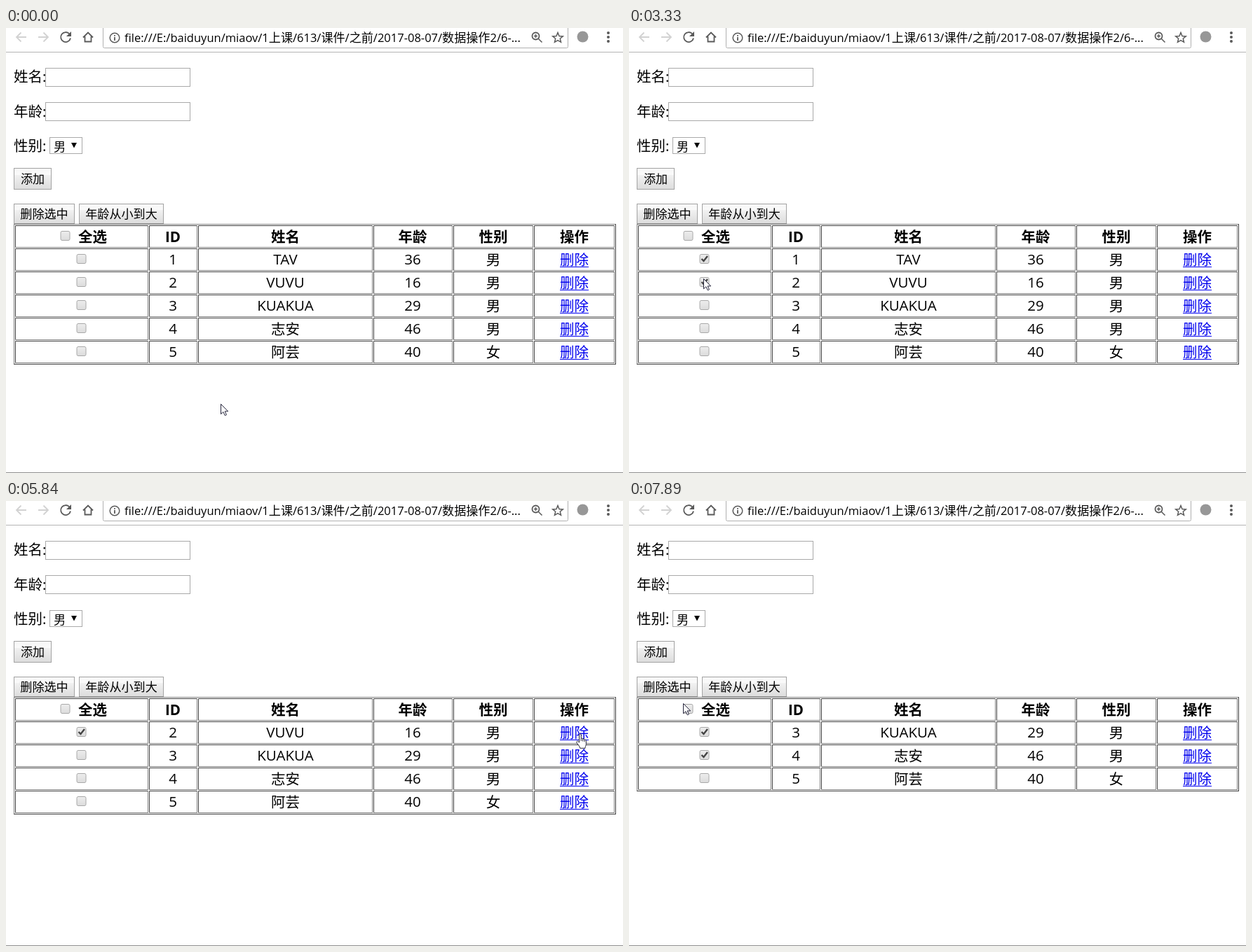
Recreate the animation shown at these times as an HTML page. Size 880 px wide and 636 px high, loop 8000 ms.

```html
<!DOCTYPE html>
<html lang="zh">
<head>
<meta charset="utf-8">
<title>数据操作</title>
<style>
html, body { margin: 0; width: 100%; height: 100%; overflow: hidden; background: #fff; }
svg { display: block; width: 880px; height: 636px; }
text { font: 20.5px "Open Sans", "Noto Sans CJK SC", sans-serif; white-space: pre; }
.mid { text-anchor: middle; }
.bold { font-weight: 700; }
.ui { font-size: 17.1px; }
.url { font-size: 16.5px; }
.url tspan { font-size: 17.1px; }
.dark { stroke: #404040; fill: none; }
.light { stroke: #808080; fill: none; }
.field { fill: #fff; stroke: #a9a9a9; }
.btn { fill: url(#btn); stroke: #a3a3a3; }
.box { fill: url(#box); stroke: #a8a8a8; }
.tick { fill: none; stroke: #444; stroke-width: 2.4; visibility: hidden; }
.icon { fill: none; stroke: #5a5a5a; stroke-width: 1.8; }
.off { stroke: #d2d2d2; }
.thin { stroke-width: 1.5; }
.link { fill: #00e; }

/* every change is a hard step; 1% = 80 ms */
.tick, .row, .shift, .side, #cursor, #arrow, #hand { animation: 8s step-end infinite; }
#row0 { animation-name: gone1; }
#row1 { animation-name: up1; }
#row1 > g { animation: gone2 8s step-end infinite; }
.shift { animation-name: up2; }
.side { animation-name: shrink; }
#row0 .tick { animation-name: tick0; }
#row1 .tick { animation-name: tick1; }
#row2 .tick { animation-name: tick2; }
#row3 .tick { animation-name: tick3; }
#cursor { animation-name: move; }
#arrow { animation-name: arrow; }
#hand { animation-name: hand; }
@keyframes gone1 { 0% { opacity: 1 } 67.625%, 100% { opacity: 0 } }
@keyframes gone2 { 0% { opacity: 1 } 76.375%, 100% { opacity: 0 } }
@keyframes up1 { 0% { transform: none } 67.625%, 100% { transform: translateY(-33px) } }
@keyframes up2 {
  0% { transform: none }
  67.625% { transform: translateY(-33px) }
  76.375%, 100% { transform: translateY(-66px) }
}
@keyframes shrink { 0% { height: 201px } 67.625% { height: 168px } 76.375%, 100% { height: 135px } }
@keyframes tick0 { 0% { visibility: hidden } 34.5%, 100% { visibility: visible } }
@keyframes tick1 { 0% { visibility: hidden } 41.625%, 100% { visibility: visible } }
@keyframes tick2 { 0% { visibility: hidden } 88.125%, 100% { visibility: visible } }
@keyframes tick3 { 0% { visibility: hidden } 91.75%, 100% { visibility: visible } }
@keyframes arrow { 0% { opacity: 1 } 60.625% { opacity: 0 } 77.875%, 100% { opacity: 1 } }
@keyframes hand { 0% { opacity: 0 } 60.625% { opacity: 1 } 77.875%, 100% { opacity: 0 } }
@keyframes move {
  0% { transform: translate(306px, 537px) }
  1.875% { transform: translate(336px, 518px) }
  3.625% { transform: translate(350px, 460px) }
  5.375% { transform: translate(290px, 385px) }
  7.125% { transform: translate(190px, 315px) }
  8.875% { transform: translate(112px, 280px) }
  10.625% { transform: translate(90px, 305px) }
  12.25% { transform: translate(98px, 323px) }
  14.125% { transform: translate(88px, 308px) }
  15.625% { transform: translate(80px, 292px) }
  17.5% { transform: translate(94px, 372px) }
  19.375% { transform: translate(100px, 450px) }
  24% { transform: translate(101px, 430px) }
  25.75% { transform: translate(100px, 375px) }
  27.5% { transform: translate(98px, 324px) }
  29.25% { transform: translate(78px, 292px) }
  31% { transform: translate(92px, 312px) }
  32.75% { transform: translate(104px, 327px) }
  34.5% { transform: translate(105px, 328px) }
  36.25% { transform: translate(106px, 349px) }
  38% { transform: translate(103px, 355px) }
  39.875% { transform: translate(107px, 357px) }
  41.625% { transform: translate(106px, 358px) }
  49.875% { transform: translate(113px, 352px) }
  51.625% { transform: translate(170px, 330px) }
  53.375% { transform: translate(290px, 313px) }
  55.25% { transform: translate(435px, 308px) }
  57% { transform: translate(595px, 312px) }
  58.75% { transform: translate(745px, 323px) }
  60.625% { transform: translate(822px, 331px) }
  62.5% { transform: translate(817px, 332px) }
  73% { transform: translate(813px, 332px) }
  77.875% { transform: translate(762px, 327px) }
  79.5% { transform: translate(610px, 320px) }
  81.25% { transform: translate(430px, 317px) }
  83% { transform: translate(270px, 319px) }
  84.75% { transform: translate(155px, 323px) }
  86.375% { transform: translate(108px, 326px) }
  88.125% { transform: translate(106px, 328px) }
  90% { transform: translate(109px, 352px) }
  91.75% { transform: translate(108px, 358px) }
  93.5% { transform: translate(114px, 348px) }
  95.25% { transform: translate(102px, 318px) }
  97% { transform: translate(83px, 294px) }
  98.625%, 100% { transform: translate(77px, 289px) }
}
</style>
</head>
<body>
<svg viewBox="0 0 880 636">
  <defs>
    <linearGradient id="btn" x2="0" y2="1">
      <stop stop-color="#f6f6f6"/><stop offset=".3" stop-color="#fafafa"/>
      <stop offset=".32" stop-color="#f1f1f1"/><stop offset="1" stop-color="#dcdcdc"/>
    </linearGradient>
    <linearGradient id="box" x2="0" y2="1">
      <stop stop-color="#ededed"/><stop offset="1" stop-color="#dcdcdc"/>
    </linearGradient>
  </defs>

  <!-- browser bar -->
  <path d="M0 34.5H880" stroke="#b4b4b4"/>
  <path d="M0 635.5H880" stroke="#8e8e8e"/>
  <rect x="138.5" y="-6" width="663" height="34.5" rx="2" fill="#fff" stroke="#b0b0b0"/>
  <path class="icon off" d="M29 13H15M21.5 6.5L15 13L21.5 19.5"/>
  <path class="icon off" d="M46 13H60M53.5 6.5L60 13L53.5 19.5"/>
  <path class="icon" d="M90.5 8.5A7 7 0 1 0 92 14.5"/>
  <path d="M93 5V12H86Z" fill="#5a5a5a"/>
  <path class="icon" d="M110 13.5L117 6.5L124 13.5M112.5 12V19.5H121.5V12"/>
  <circle class="icon thin" cx="155" cy="14" r="6.8"/>
  <path class="icon" d="M155 13V18M155 10V11.7"/>
  <text class="url" x="169" y="19.5">file:///E:/baiduyun/miaov/1<tspan>上课</tspan>/613/<tspan>课件</tspan>/<tspan>之前</tspan>/2017-08-07/<tspan>数据操作</tspan>2/6-...</text>
  <circle class="icon" cx="755.5" cy="11.5" r="5"/>
  <path class="icon thin" d="M759 15L764.5 20.5M753 11.5H758M755.5 9V14"/>
  <path class="icon thin" d="M787 6.5L789 11.5L794.3 11.9L790.3 15.3L791.5 20.3L787 17.6L782.5 20.3L783.7 15.3L779.7 11.9L785 11.5Z"/>
  <circle cx="822.5" cy="12.5" r="8" fill="#979797"/>
  <g fill="#5a5a5a"><circle cx="859" cy="7" r="2"/><circle cx="859" cy="13" r="2"/><circle cx="859" cy="19" r="2"/></g>

  <!-- form -->
  <text x="11" y="77">姓名:</text>
  <text x="11" y="126.5">年龄:</text>
  <text x="11" y="175.5">性别:</text>
  <rect class="field" x="56.5" y="57.5" width="206" height="26"/>
  <rect class="field" x="56.5" y="106.5" width="206" height="26"/>
  <rect class="field" x="62.5" y="156.5" width="46" height="23"/>
  <text class="ui" x="68" y="175.5">男</text>
  <path d="M93 164H101L97 171.5Z"/>
  <rect class="btn" x="11.5" y="200.5" width="53" height="30"/>
  <rect class="btn" x="11.5" y="251.5" width="86" height="28"/>
  <rect class="btn" x="104.5" y="251.5" width="120" height="28"/>
  <text class="ui mid" x="38" y="222">添加</text>
  <text class="ui mid" x="54.5" y="272">删除选中</text>
  <text class="ui mid" x="164.5" y="272">年龄从小到大</text>

  <!-- table frame -->
  <path class="light" d="M11 280.5H870"/>
  <rect class="side" x="11" y="280" width="1" height="201" fill="#808080"/>
  <rect class="side" x="869" y="280" width="1" height="201" fill="#404040"/>
  <path class="dark shift" d="M11 480.5H870"/>
  <g id="table"></g>

  <g id="cursor">
    <path id="arrow" d="M.5 .5V14.8L3.9 11.7L6.3 16.8L8.5 15.8L6.2 10.9H10.7Z" fill="#fff" stroke="#23233a"/>
    <path id="hand" d="M4.5 2C4.5 .2 7.2 .2 7.2 2V7.5C8.2 6.6 9.6 7 9.7 8.2C10.7 7.5 12 8 12.1 9.2C13.2 8.6 14.4 9.3 14.4 10.7V15.5C14.4 18 13 18.5 13 21.3H5.7C5.7 18.5 1.7 15.5 .8 12.7C.5 11.2 2.3 10.7 3.2 11.7L4.5 13.2ZM7.2 7.5V11M9.7 8.2V11.5M12.1 9.2V12" fill="#fff" stroke="#23233a"/>
  </g>
</svg>
<script>
const cols = [[13, 202], [204, 272], [274, 522], [524, 636], [638, 751], [753, 867]];
const centers = [0, 238, 398.5, 580, 695, 810.5];
const people = [
  [1, 'TAV', 36, '男'],
  [2, 'VUVU', 16, '男'],
  [3, 'KUAKUA', 29, '男'],
  [4, '志安', 46, '男'],
  [5, '阿芸', 40, '女'],
];

const cells = y => cols.map(([l, r]) =>
  `<path class="light" d="M${l} ${y + 31}.5H${r + 1}M${r}.5 ${y}V${y + 31}"/>` +
  `<path class="dark" d="M${l}.5 ${y + 31}V${y}.5H${r}"/>`).join('');

const label = (col, y, str, cls = '') =>
  `<text class="mid ${cls}" x="${centers[col]}" y="${y}">${str}</text>`;

const checkbox = (x, y) =>
  `<rect class="box" x="${x - 6.5}" y="${y - 6.5}" width="13" height="13" rx="2"/>`;

// Latin text sits slightly higher than Chinese
const baseline = v => /\w/.test(v) ? 23 : 23.7;

function row(person, i) {
  const y = 315 + 33 * i;
  const texts = person.map((v, c) => label(c + 1, y + baseline(v), v)).join('');
  const tick = `<path class="tick" d="M103.5 ${y + 15}L106.5 ${y + 18}L112 ${y + 11}"/>`;
  const link = label(5, y + 24.2, '删除', 'link') +
    `<path d="M790 ${y + 26.5}H831" stroke="#00e"/>`;
  return `<g class="row ${i > 1 ? 'shift' : ''}" id="row${i}"><g>` +
    cells(y) + checkbox(107.5, y + 15) + tick + texts + link + '</g></g>';
}

const heads = ['ID', '姓名', '年龄', '性别', '操作'];
document.getElementById('table').innerHTML =
  cells(282) + checkbox(84.5, 297) +
  '<text class="bold" x="103" y="305.7">全选</text>' +
  heads.map((h, i) => label(i + 1, 305.7, h, 'bold')).join('') +
  people.map(row).join('');
</script>
</body>
</html>
```
